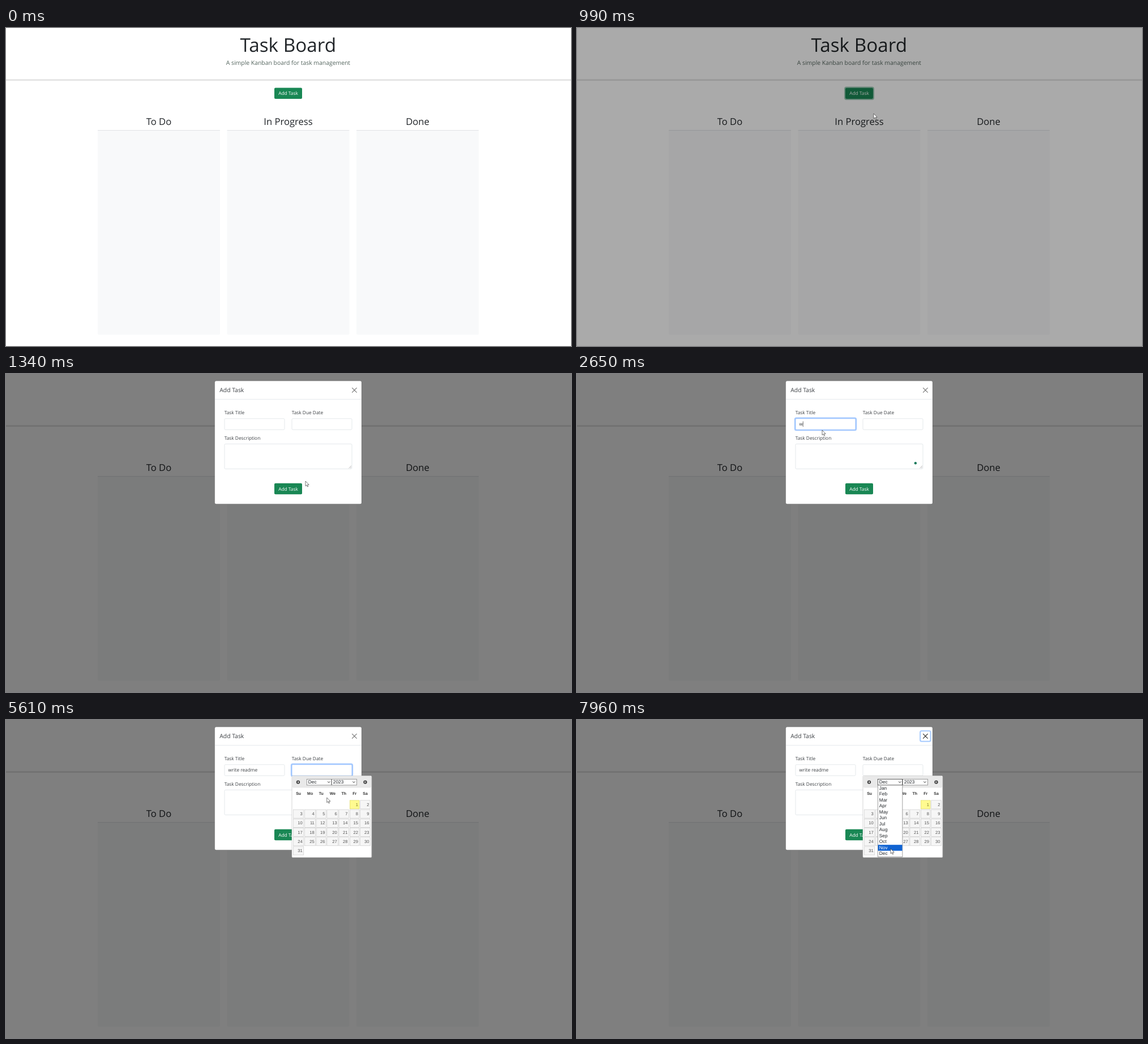
An HTML page that plays this animation: 998 by 561 pixels, repeating every 8000 ms.

```html
<!DOCTYPE html>
<html lang="en">
<head>
<meta charset="utf-8">
<title>Task Board</title>
<style>
  html, body { margin: 0; width: 100%; height: 100%; overflow: hidden; background: #fff; }
  svg { display: block; width: 998px; height: 561px; }
  text { font: 8.32px "Open Sans", sans-serif; fill: #212529; text-rendering: geometricPrecision; white-space: pre; }
  .mid { text-anchor: middle; }
  .h1 { font-size: 33.27px; }
  .lead { font-size: 10.4px; fill: #53645d; }
  .h2 { font-size: 16.63px; }
  .h5 { font-size: 10.4px; fill: #3b3f43; }
  .label { fill: #3b3f43; }
  .btn { fill: #198754; }
  .btn.hover { fill: #157347; }
  .btn-text { fill: #fff; font-weight: 500; }
  .field { fill: #fff; stroke: #dee2e6; stroke-width: .8; }
  .field.focus { stroke: #86b7fe; }
  .ring { fill: none; stroke: #0d6efd; stroke-opacity: .36; stroke-width: 2.1; }
  #calendar text { font-family: "Liberation Sans", Arial, sans-serif; }
  #calendar .weekday { font-size: 7px; font-weight: 700; fill: #333; }
  #calendar .day { font-size: 7.6px; fill: #555; text-anchor: end; }
  .cell { fill: #f6f6f6; stroke: #c5c5c5; stroke-width: .6; }
  .today { fill: #fffa90; stroke: #dad55e; }
  #calendar .today-text { fill: #777620; }
  .select { fill: #fff; stroke: #767676; stroke-width: .7; }
  .line { fill: none; stroke: #222; }
  #calendar .picked { fill: #fff; }
</style>
</head>
<body>
<svg viewBox="0 0 998 561">
  <rect width="998" height="561" fill="#fff"/>
  <text class="h1 mid" x="498.3" y="42">Task Board</text>
  <text class="lead mid" x="498.4" y="65.4">A simple Kanban board for task management</text>
  <rect y="90.4" width="998" height="2.6" fill="#e2e2e2"/>
  <rect id="openRing" x="473" y="104.4" width="51" height="21.6" rx="3" fill="none" stroke="#3c996e" stroke-opacity=".5" stroke-width="2"/>
  <rect id="openBtn" class="btn" x="474" y="105.4" width="49" height="19.6" rx="2"/>
  <text class="btn-text mid" x="498.5" y="118.2">Add Task</text>
  <g id="columns"></g>

  <rect id="backdrop" width="998" height="561"/>

  <g id="modal">
    <rect x="368.8" y="12.2" width="259.2" height="217" rx="2.5" fill="#fff" stroke="#000" stroke-opacity=".175" stroke-width=".6"/>
    <text class="h5" x="377.2" y="32.2">Add Task</text>
    <path d="M369 44.7H628" stroke="#dee2e6" stroke-width=".8"/>
    <rect id="closeRing" class="ring" x="606.2" y="19.3" width="18.4" height="18.4" rx="2.5"/>
    <path id="close" d="M611.5 24.6l7.8 7.8m0 -7.8l-7.8 7.8" stroke="#000" stroke-width="1.1" stroke-linecap="round"/>
    <text class="label" x="385.8" y="71">Task Title</text>
    <text class="label" x="504.8" y="71">Task Due Date</text>
    <text class="label" x="385.8" y="115.5">Task Description</text>
    <rect id="titleRing" class="ring" x="384.9" y="77.6" width="108.2" height="21.6" rx="2.5"/>
    <rect id="titleField" class="field" x="386" y="78.7" width="106" height="19.5" rx="1.8"/>
    <text id="typed" class="label" x="392.5" y="91.4"></text>
    <rect id="caret" y="83.4" width=".6" height="9.8" fill="#222"/>
    <rect id="dateRing" class="ring" x="503.9" y="77.6" width="108.2" height="21.6" rx="2.5"/>
    <rect id="dateField" class="field" x="505" y="78.7" width="106" height="19.5" rx="1.8"/>
    <rect class="field" x="386" y="123.4" width="225" height="44" rx="1.8"/>
    <path d="M605.6 166.2l4.4 -4.4m-1.9 4.4l1.9 -1.9" stroke="#888" stroke-width=".6"/>
    <circle id="dot" cx="597.9" cy="157.2" r="2.2" fill="#15795a"/>
    <rect class="btn" x="474" y="192.7" width="49" height="19.6" rx="2"/>
    <text class="btn-text mid" x="498.5" y="205.5">Add Task</text>
  </g>

  <g id="calendar">
    <rect x="505" y="98.6" width="140.8" height="143.8" rx="1.5" fill="#fff" stroke="#c5c5c5" stroke-width=".7"/>
    <rect x="506.2" y="99.8" width="138.4" height="19.2" rx="1.5" fill="#e9e9e9" stroke="#ddd" stroke-width=".6"/>
    <rect id="prevHover" x="509.5" y="102.2" width="13.5" height="14.8" rx="1.5" fill="#ededed" stroke="#ccc" stroke-width=".7"/>
    <g fill="#444"><circle cx="516" cy="109.6" r="3.2"/><circle cx="634.5" cy="109.6" r="3.2"/></g>
    <path d="M517 108v3.2l-2.4 -1.6zM633.5 108v3.2l2.4 -1.6z" fill="#fff"/>
    <rect id="monthSelect" class="select" x="531.3" y="104.3" width="43.4" height="10.6"/>
    <rect class="select" x="575.6" y="104.3" width="43.8" height="10.6"/>
    <text x="533.8" y="112.4">Dec</text>
    <text x="577.8" y="112.4">2023</text>
    <path class="line" d="M568.2 108.5l2 2 2 -2m40.2 0l2 2 2 -2"/>
    <g id="days"></g>
    <g id="months"></g>
  </g>

  <path id="cursor" d="M0 0V8.7L2 6.9 3.4 10 4.8 9.4 3.4 6.4H6.2Z" fill="#fff" stroke="#222" stroke-width=".6"/>
</svg>
<script>
const LOOP = 8000, FRAME = 66.33;
const $ = id => document.getElementById(id);
const show = (id, on) => { $(id).style.display = on ? '' : 'none'; };
const clamp = v => Math.min(1, Math.max(0, v));
const text = (cls, x, y, s) => `<text class="${cls}" x="${x}" y="${y}">${s}</text>`;
const rect = (cls, x, y, w, h, extra = '') => `<rect class="${cls}" x="${x}" y="${y}" width="${w}" height="${h}" ${extra}/>`;

$('columns').innerHTML = ['To Do', 'In Progress', 'Done'].map((name, i) => {
  const x = 162 + i * 228.5;
  return rect('', x, 180.5, 216, 360.5, 'rx="2" fill="#f8f9fa"')
    + rect('', x, 180.2, 216, .9, 'fill="#dcdfe3"')
    + text('h2 mid', x + 108, 170.9, name);
}).join('');

// Calendar: December 2023 starts on a Friday
const cellLeft = [507.5, 527.5, 548, 567, 588, 607.3, 625.7];
const cellRight = [525.8, 546.8, 565.5, 586.8, 605.5, 624, 643.5];
let days = ['Su', 'Mo', 'Tu', 'We', 'Th', 'Fr', 'Sa']
  .map((d, i) => text('weekday mid', (cellLeft[i] + cellRight[i]) / 2, 132.2, d)).join('');
for (let d = 1; d <= 31; d++) {
  const col = (d + 4) % 7, y = 141.8 + Math.floor((d + 4) / 7) * 16.25;
  days += rect(d === 1 ? 'cell today' : 'cell', cellLeft[col], y, cellRight[col] - cellLeft[col], 15)
    + text(d === 1 ? 'day today-text' : 'day', cellRight[col] - 2, y + 10.1, d);
}
$('days').innerHTML = days;

const LIST_TOP = 115.4, ITEM = 10.48;
$('months').innerHTML = rect('select', 531.3, 115, 43.6, 126.6)
  + rect('', 531.7, 0, 42.8, ITEM, 'id="pick" fill="#1063d2"')
  + 'Jan Feb Mar Apr May Jun Jul Aug Sep Oct Nov Dec'.split(' ')
    .map((m, i) => text('month', 533.8, LIST_TOP + i * ITEM + 7.6, m)).join('');
const months = [...document.querySelectorAll('.month')];

// Pointer stops: time, x, y
const path = [
  [66, 896, 370], [330, 735, 262], [600, 556, 142], [790, 516, 118], [929, 515, 117],
  [995, 524, 151], [1326, 529, 189], [1680, 516, 183], [1770, 505, 168], [2000, 444, 101],
  [2140, 433, 88], [2190, 433, 88], [2280, 433, 99], [5430, 433, 99], [5572, 567, 137],
  [5800, 622, 151], [6060, 622, 151], [6350, 596, 122], [6580, 552, 90], [6830, 515, 107],
  [6900, 515, 107], [7030, 552, 110], [7330, 552, 111], [7600, 553, 170], [7860, 554, 222], [7960, 554, 227]
];
function pointerAt(t) {
  const i = path.findIndex(p => p[0] > t);
  if (i < 0) return path[path.length - 1].slice(1);
  if (i === 0) return path[0].slice(1);
  const [a, b] = [path[i - 1], path[i]], k = (t - a[0]) / (b[0] - a[0]);
  return [a[1] + (b[1] - a[1]) * k, a[2] + (b[2] - a[2]) * k];
}

const phrase = 'write readme';
const keyTimes = [2650, 2780, 3110, 3180, 3380, 3450, 3980, 4050, 4250, 4450, 4650, 4730];
let shown = null;

function focus(name, on) {
  show(name + 'Ring', on);
  $(name + 'Field').classList.toggle('focus', on);
}

function draw(t) {
  // Movement advances at the recording's frame rate
  const q = Math.floor((t + 10) / FRAME) * FRAME;
  const [x, y] = pointerAt(q);
  $('cursor').setAttribute('transform', `translate(${x} ${y})`);
  show('cursor', t >= 70);

  const overOpen = t >= 70 && t < 985 && x > 474 && x < 523 && y > 105 && y < 125;
  $('openBtn').classList.toggle('hover', overOpen);
  show('openRing', t >= 850);

  $('backdrop').style.opacity = clamp((q - 893.5) / 152) * .5;
  const slide = 1 - clamp((q - 1052) / 270);
  $('modal').style.opacity = clamp((q - 1052) / 150);
  $('modal').setAttribute('transform', `translate(0 ${-26 * slide ** 2})`);
  show('dot', t >= 1540);

  const titleFocus = t >= 2160 && t < 5060, listOpen = t >= 7260;
  focus('title', titleFocus);
  focus('date', t >= 5060 && !listOpen);
  show('closeRing', listOpen);
  $('close').style.opacity = listOpen ? .85 : .55;

  const value = phrase.slice(0, keyTimes.filter(k => k <= t).length);
  if (value !== shown) {
    $('typed').textContent = shown = value;
    $('caret').setAttribute('x', 392.4 + (value ? $('typed').getComputedTextLength() : 0));
  }
  show('caret', titleFocus);

  $('calendar').style.opacity = clamp((q - 4975) / 265);
  show('calendar', t >= 5050);
  show('prevHover', !listOpen && x > 509 && x < 523 && y > 102 && y < 117);
  $('monthSelect').style.stroke = listOpen ? '#222' : '';
  show('months', listOpen);
  const pick = y < LIST_TOP ? 11 : Math.min(11, Math.floor((y - LIST_TOP) / ITEM));
  $('pick').setAttribute('y', LIST_TOP + pick * ITEM);
  months.forEach((m, i) => m.classList.toggle('picked', i === pick));
}

function tick() {
  draw(performance.now() % LOOP);
  requestAnimationFrame(tick);
}
tick();
</script>
</body>
</html>
```
